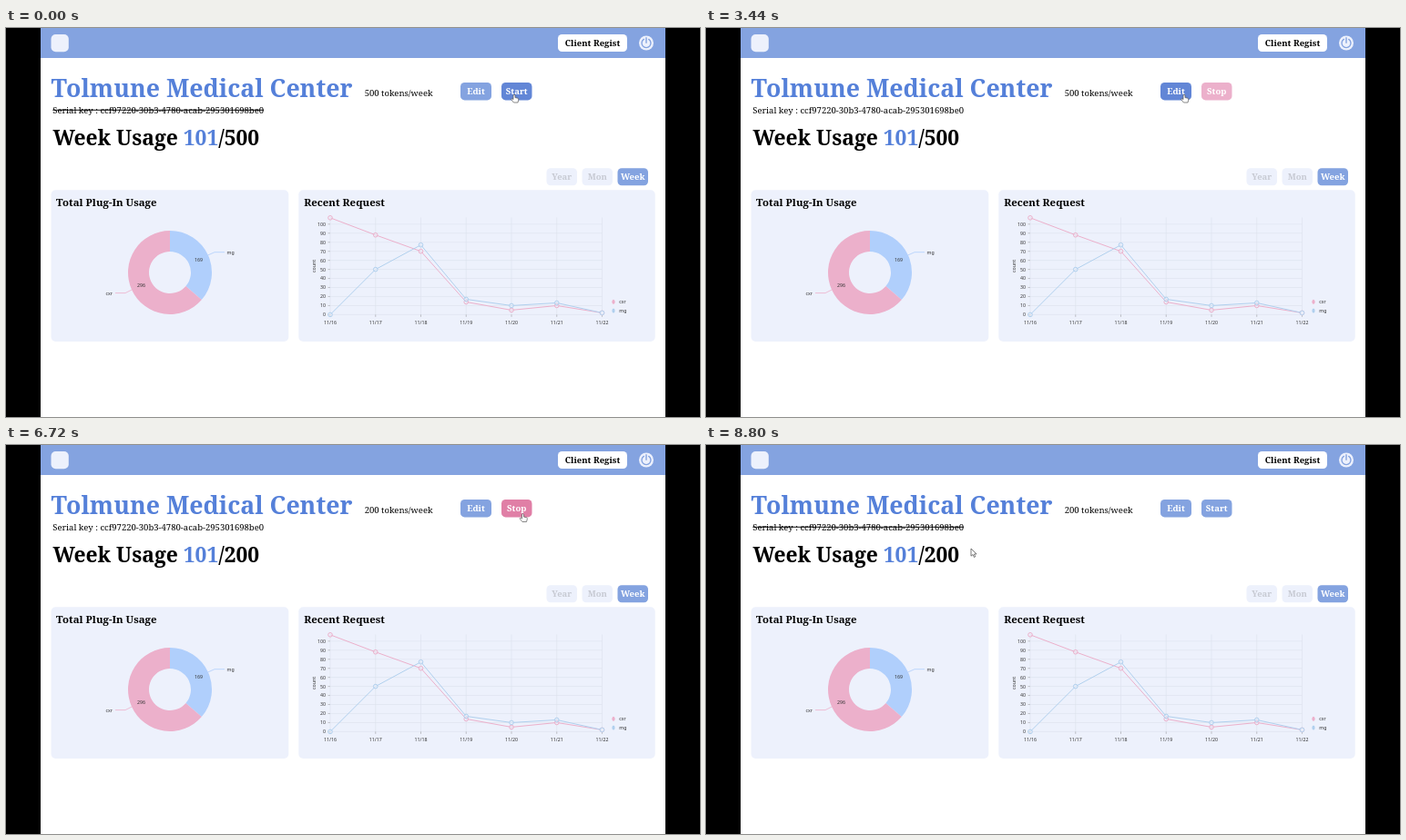
Animation, 762 px wide and 428 px high, one loop 8880 ms. Source, as an HTML page:

```html
<!DOCTYPE html>
<html lang="en">
<head>
<meta charset="utf-8">
<title>Client dashboard</title>
<style>
  html, body { margin: 0; width: 100%; height: 100%; overflow: hidden; background: #000; }
  svg { display: block; width: 762px; height: 428px; }
  text { font-family: "Noto Serif", serif; font-size: 9.53px; white-space: pre; }
  .bold { font-weight: 700; }
  .chart text { font-family: "Noto Sans", sans-serif; font-size: 5.24px; fill: #333; }
  .mid { text-anchor: middle; }
  .end { text-anchor: end; }
</style>
</head>
<body>
<svg id="stage" viewBox="0 0 762 428"></svg>
<script>
const LOOP = 8880, STEP = 80;
const BLUE = '#84a3e0', BLUE_HOVER = '#6286d6', ROSE = '#ecb0cb', ROSE_HOVER = '#e07fa6';
const PANEL = '#edf1fc', TITLE = '#5580d9', SKY = '#b0cffc', LINE_BLUE = '#b0d0ee';

const rect = (x, y, w, h, r, fill, extra = '') =>
  `<rect x="${x}" y="${y}" width="${w}" height="${h}" rx="${r}" fill="${fill}" ${extra}/>`;
const text = (x, y, str, { size = 9.53, fill = '#000', cls = '', id = '' } = {}) =>
  `<text x="${x}" y="${y}" class="${cls}" ${id && `id="${id}"`} style="font-size:${size}px" fill="${fill}">${str}</text>`;
const path = (d, stroke, width = 1, extra = '') =>
  `<path d="${d}" fill="none" stroke="${stroke}" stroke-width="${width}" ${extra}/>`;
const button = (id, x, y, w, h, label, fill, color, size = 9.53) =>
  `<g id="${id}">${rect(x, y, w, h, 4.5, fill)}${text(x + w / 2, y + h / 2 + size * 0.36, label, { size, fill: color, cls: 'bold mid' })}</g>`;

function header() {
  return rect(38, 0, 686, 33, 0, BLUE);
}

function headerItems() {
  return rect(49.5, 7, 19.3, 19.3, 5, PANEL)
    + button('regist', 606, 7, 76, 19, 'Client Regist', '#fff', '#000')
    + `<circle cx="703" cy="16.5" r="8" fill="${PANEL}"/>`
    + path('M700.3 12.4a5 5 0 1 0 5.4 0M703 10.8v5.4', BLUE, 1.4, 'stroke-linecap="round"');
}

function donut() {
  const cx = 180, cy = 269, outer = 46, inner = 23;
  const total = 465;
  const at = (a, r) => `${(cx + r * Math.sin(a)).toFixed(2)} ${(cy - r * Math.cos(a)).toFixed(2)}`;
  const slice = (from, to, fill) => {
    const a = from / total * 2 * Math.PI, b = to / total * 2 * Math.PI, large = b - a > Math.PI ? 1 : 0;
    return `<path fill="${fill}" d="M${at(a, outer)}A${outer} ${outer} 0 ${large} 1 ${at(b, outer)}L${at(b, inner)}A${inner} ${inner} 0 ${large} 0 ${at(a, inner)}Z"/>`;
  };
  return slice(0, 169, SKY) + slice(169, total, ROSE)
    + path('M221.8 249.9L229 246.7H240', SKY, 0.8) + path('M138.1 288L131 291.6H120', ROSE, 0.8)
    + '<text x="242.5" y="248.5">mg</text><text x="117" y="293.5" class="end">cxr</text>'
    + '<text x="211.4" y="256.6" class="mid">169</text><text x="148.4" y="285.3" class="mid">296</text>';
}

function lineChart() {
  const px = i => 356 + i * 49.75, py = v => 315.4 - v * 0.996;
  let out = '';
  for (let v = 0; v <= 100; v += 10) {
    out += path(`M356 ${py(v)}H654.5`, '#dce1ed', 0.6) + path(`M353.6 ${py(v)}H356`, '#888', 0.5)
      + `<text x="351" y="${py(v) + 1.9}" class="end">${v}</text>`;
  }
  for (let i = 0; i < 7; i++) {
    out += path(`M${px(i)} 208.5V315.4`, '#dce1ed', 0.6) + path(`M${px(i)} 315.4v2.4`, '#888', 0.5)
      + `<text x="${px(i)}" y="325.7" class="mid">11/${16 + i}</text>`;
  }
  const series = [[[107, 88, 70, 14, 5, 10, 2], ROSE], [[0, 50, 77, 17, 10, 13, 2], LINE_BLUE]];
  for (const [values, color] of series)
    out += path('M' + values.map((v, i) => `${px(i)} ${py(v)}`).join('L'), color, 1);
  for (const [values, color] of series)
    out += values.map((v, i) => `<circle cx="${px(i)}" cy="${py(v)}" r="2.3" fill="${PANEL}" fill-opacity=".5" stroke="${color}"/>`).join('');
  out += '<text transform="translate(339.5 262)rotate(-90)" class="mid">count</text>';
  ['cxr', 'mg'].forEach((name, i) => {
    const y = 301.3 + i * 9.6;
    out += `<ellipse cx="667" cy="${y}" rx="1.6" ry="2.5" fill="${series[i][1]}"/><text x="673.3" y="${y + 1.9}">${name}</text>`;
  });
  return out;
}

function page() {
  return rect(38, 0, 686, 428, 0, '#fff') + header()
    + text(49.5, 76, 'Tolmune Medical Center', { size: 26.68, fill: TITLE, cls: 'bold' })
    + text(393.7, 75.3, '', { id: 'plan' })
    + rect(51.3, 83, 232.5, 14, 0, '#4a60c4', 'id="selection"')
    + text(51.3, 93.6, 'Serial key : ccf97220-30b3-4780-acab-295301698be0', { id: 'serial' })
    + text(51.5, 128.8, `Week Usage <tspan fill="${TITLE}">101</tspan>/<tspan id="limit"></tspan>`, { size: 22.87, cls: 'bold' })
    + button('edit', 499, 60, 34, 19.4, 'Edit', BLUE, '#fff')
    + button('toggle', 544, 60, 33.5, 19.4, 'Start', BLUE, '#fff')
    + button('year', 593.5, 154.3, 33.5, 19, 'Year', PANEL, '#c7cad3')
    + button('month', 632.5, 154.3, 33.5, 19, 'Mon', PANEL, '#c7cad3')
    + button('week', 671.5, 154.3, 33.5, 19, 'Week', BLUE, '#fff')
    + rect(49.5, 178.3, 260.8, 166.7, 5, PANEL) + rect(321.3, 178.3, 391.4, 166.7, 5, PANEL)
    + text(55, 195.7, 'Total Plug-In Usage', { size: 11.43, cls: 'bold' })
    + text(327.2, 195.7, 'Recent Request', { size: 11.43, cls: 'bold' })
    + `<g class="chart">${donut()}${lineChart()}</g>`;
}

function modifyDialog() {
  return '<g id="modify">' + rect(286, 107, 190, 214.5, 8, PANEL)
    + path('M301 119.2H313V131H309.6L307 133.6L304.4 131H301Z', '#111', 1.5, 'stroke-linejoin="round"')
    + path('M304.2 127.6L310 121.9', '#111', 2)
    + text(321, 131.6, 'Modify Client', { size: 14.3, cls: 'bold' })
    + path('M454.5 122.8l7 7m0-7l-7 7', '#111', 1.1)
    + text(297, 165.2, 'Client Name') + rect(297, 169.3, 168, 24, 4, '#fff')
    + text(304.7, 184, 'Tolmune Medical Center', { size: 7.62 })
    + text(297, 209.2, 'Plan') + rect(297, 213, 168, 24, 4, '#fff')
    + text(306.8, 227.8, '', { size: 7.62, id: 'option' })
    + path('M458.9 224.1l2 2l2-2', '#111', 0.9)
    + button('confirm', 383, 293, 38, 19, 'Modify', BLUE, '#000', 7.62)
    + button('cancel', 427, 293, 37.6, 19, 'Cancel', '#c1c1c4', '#000', 7.62) + '</g>';
}

function warningDialog() {
  const lines = ['Are you sure you want to suspend this', 'serial key? This action will prevent the',
    'user from accessing their services and', 'cannot be easily undone.'];
  return '<g id="warning">' + rect(264.3, 148, 233.5, 133, 8, '#fff')
    + '<circle cx="289" cy="174.3" r="8.8" fill="none" stroke="#bd5a80" stroke-width="1.9"/>'
    + path('M289 169.5v5.6M289 177.2v2', '#bd5a80', 1.9)
    + text(309.6, 180.6, 'Warning', { size: 19.06, cls: 'bold' })
    + lines.map((line, i) => text(309.6, 198.4 + i * 14.3, line)).join('')
    + button('suspend', 404, 250.3, 34, 19.3, 'Stop', ROSE, '#000', 7.62)
    + button('keep', 443, 250.3, 34, 19.3, 'Cancle', '#e9ebf0', '#000', 7.62) + '</g>';
}

const cursors = '<g id="pointer">'
  + '<path id="arrow" d="M0 0V8.2L2 6.5L3.4 9.5L4.7 8.9L3.4 6H6Z" fill="#fff" stroke="#444" stroke-width=".7"/>'
  + '<path id="hand" d="M-1 .8Q0-.4 1 .8V3.6L4 4.2Q5 4.6 4.8 6L4 9H-.6L-3.2 5.8Q-3.4 4.5-2.2 4.7L-1 5.6Z" fill="#fff" stroke="#555" stroke-width=".7"/>'
  + '<path id="beam" d="M-1.8-4Q0-4 0-3Q0-4 1.8-4M0-3V3.5M-1.8 4.5Q0 4.5 0 3.5Q0 4.5 1.8 4.5M-1 1H1" fill="none" stroke="#333" stroke-width=".8"/></g>';

document.getElementById('stage').innerHTML = page()
  + rect(38, 0, 686, 428, 0, '#000', 'id="dim"') + headerItems() + modifyDialog() + warningDialog() + cursors;
const $ = Object.fromEntries([...document.querySelectorAll('[id]')].map(el => [el.id, el]));

// Pointer stops: time, x, y
const route = [
  [0, 558, 73], [560, 220, 116], [800, 220, 116], [1440, 558, 73], [1600, 558, 73], [1760, 610, 90],
  [1840, 606, 91], [2000, 284, 91], [2240, 57, 98], [2720, 70, 96], [3280, 525, 73], [3600, 525, 73],
  [4560, 374, 283.5], [4640, 374, 283.5], [5040, 380, 225], [5280, 380, 231], [5600, 404, 301], [5760, 404, 301],
  [6240, 567.5, 75.5], [6800, 567.5, 75.5], [7280, 424, 256], [8320, 424, 256], [8800, 291, 114], [LOOP, 291, 114]
];

const ramp = (t, from, to) => Math.min(1, Math.max(0, (t - from) / (to - from)));
const pulse = (t, a, b, c, d) => ramp(t, a, b) - ramp(t, c, d);
const ease = k => k * k * (3 - 2 * k);

function pointerAt(t) {
  const i = Math.max(1, route.findIndex(stop => stop[0] >= t));
  const [t0, x0, y0] = route[i - 1], [t1, x1, y1] = route[i];
  const k = ease(ramp(t, t0, t1));
  return [x0 + (x1 - x0) * k, y0 + (y1 - y0) * k];
}

function hovered(id, [x, y]) {
  const box = $[id].firstChild, n = name => +box.getAttribute(name);
  return x >= n('x') && x <= n('x') + n('width') && y >= n('y') && y <= n('y') + n('height');
}

function show(el, opacity) {
  el.setAttribute('opacity', opacity);
  el.style.display = opacity > 0 ? '' : 'none';
}

function render(t) {
  const p = pointerAt(t);
  const active = t >= 1520 && t < 8400;
  const limit = t >= 5760 ? 200 : 500;
  const modify = pulse(t, 3520, 3760, 5680, 5920), warn = pulse(t, 6800, 7040, 8240, 8560);
  const selecting = t >= 2000 && t < 2880;
  const onPage = modify + warn === 0;

  $.plan.textContent = `${limit} tokens/week`;
  $.limit.textContent = limit;
  $.option.textContent = t < 5280 ? 'platinum - 500tokens' : 'gold - 200tokens';
  $.serial.style.textDecoration = active ? 'none' : 'line-through';

  const left = Math.max(51.3, Math.min(283.8, p[0]));
  const start = t >= 2240 ? 51.3 : left;
  $.selection.setAttribute('x', start);
  $.selection.setAttribute('width', 283.8 - start);
  show($.selection, selecting ? 1 : 0);
  $.serial.setAttribute('fill', selecting && start < 167 ? '#fff' : '#000');

  const paint = (id, live, base, hover) => {
    const on = live && hovered(id, p);
    $[id].firstChild.setAttribute('fill', on ? hover : base);
    return on;
  };
  const overButton = [
    paint('edit', onPage, BLUE, BLUE_HOVER),
    paint('toggle', onPage, active ? ROSE : BLUE, active ? ROSE_HOVER : BLUE_HOVER),
    paint('confirm', modify > 0, BLUE, BLUE_HOVER),
    paint('suspend', warn > 0, ROSE, ROSE_HOVER)
  ].some(Boolean);
  $.toggle.lastChild.textContent = active ? 'Stop' : 'Start';

  show($.dim, 0.3 * (modify + warn));
  show($.modify, modify);
  show($.warning, warn);

  const overText = onPage && p[0] < 284 && p[1] > 82 && p[1] < 132;
  const shape = overButton ? 'hand' : overText ? 'beam' : 'arrow';
  for (const name of ['arrow', 'hand', 'beam']) show($[name], name === shape ? 1 : 0);
  $.pointer.setAttribute('transform', `translate(${p[0].toFixed(2)} ${p[1].toFixed(2)})`);
}

const began = performance.now();
function tick() {
  const t = (performance.now() - began) % LOOP;
  render(Math.floor(t / STEP) * STEP);
  requestAnimationFrame(tick);
}
render(0);
requestAnimationFrame(tick);
</script>
</body>
</html>
```
